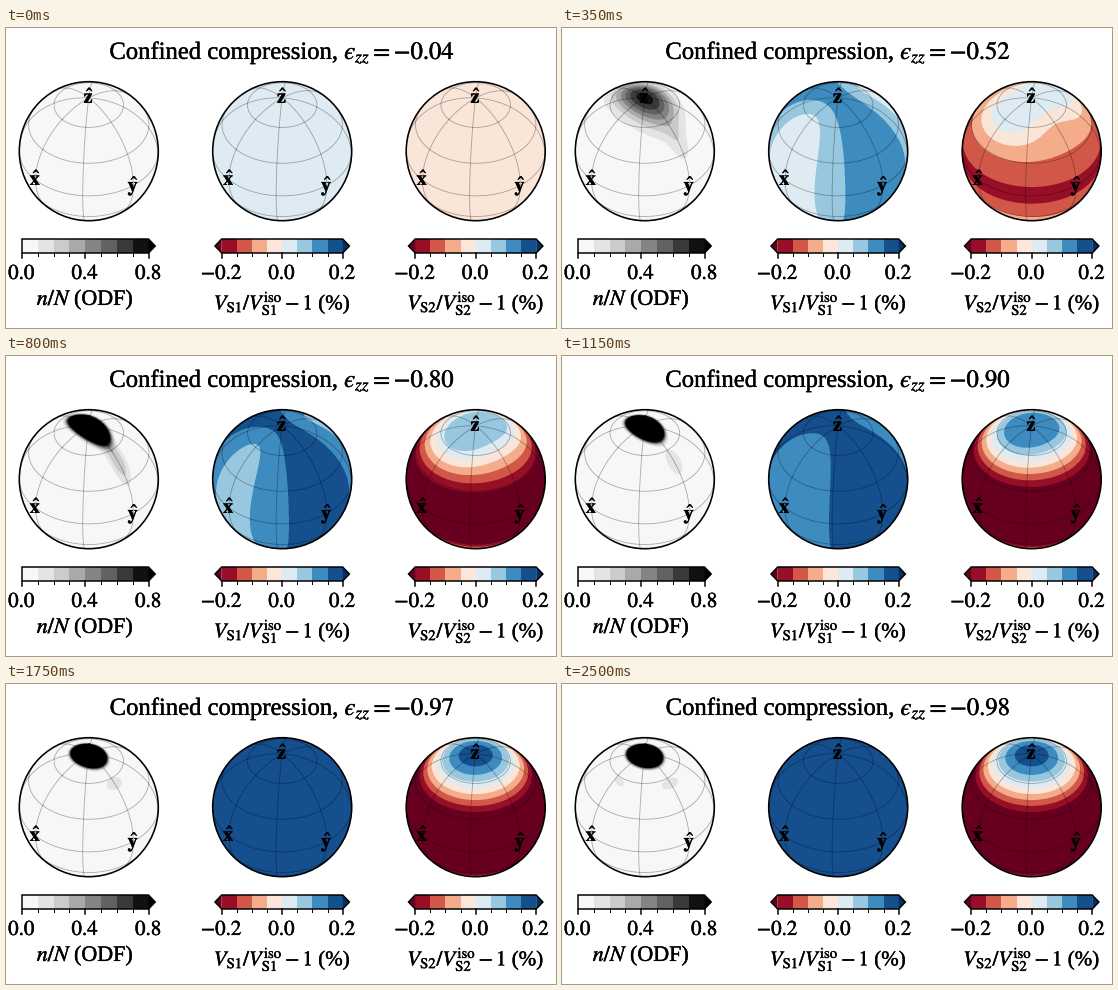
These frames come from a looping animation (550 px wide and 300 px high, 2.8 s). A matplotlib script:

```python
import numpy as np
import matplotlib.pyplot as plt
from matplotlib.animation import FuncAnimation
from matplotlib.patches import Circle, Polygon, Rectangle
from matplotlib.patheffects import withStroke

plt.rcParams.update({
    "font.family": "Liberation Serif",
    "mathtext.fontset": "stix",
})

W, H, DPI = 550, 300, 100
FRAMES, INTERVAL = 56, 50
PX = 72 / DPI                      # points per pixel

R = 69.5
CY = 123.2
CENTRES = (82.8, 276.2, 469.7)
BOX, SS = 142, 3                   # image size and supersampling

# Orthographic view: longitude 50, latitude 40
LON, LAT = np.radians(50), np.radians(40)
RIGHT = np.array([-np.sin(LON), np.cos(LON), 0])
UP = np.array([-np.sin(LAT) * np.cos(LON), -np.sin(LAT) * np.sin(LON), np.cos(LAT)])
TOWARD = np.array([np.cos(LAT) * np.cos(LON), np.cos(LAT) * np.sin(LON), np.sin(LAT)])

# Field parameters at a few values of logarithmic strain
STRAIN = [0.04, 0.73, 1.61, 2.30, 2.82, 3.90]
ODF_KEYS = {
    "log_peak": [-2.53, -0.27, 0.92, 1.10, 1.10, 1.10],
    "sx": [1.60, 0.35, 0.20, 0.205, 0.215, 0.23],
    "sy": [1.60, 0.54, 0.385, 0.325, 0.295, 0.27],
    "power": [2, 2, 4, 4.5, 5, 5],
    "tail": [0, 0.13, 0.30, 0.18, 0.13, 0.125],
    "tail_at": [0.9, 0.90, 0.68, 0.72, 0.62, 0.61],
    "tail_y": [0.35, 0.35, 0.40, 0.25, 0.24, 0.16],
    "tail_x": [0.16, 0.16, 0.13, 0.14, 0.21, 0.30],
    "spot": [0, 0, 0, 0, 0.06, 0.115],
}
S1_KEYS = {
    "base": [0.025, 0.021, 0.087, 0.123, 0.160, 0.172],
    "rise": [0, 0.116, 0.093, 0.060, 0.030, 0.015],
    "pole": [0.10, 0.10, 0.056, 0.08, 0.08, 0.08],
}
S2_KEYS = {
    "base": [-0.025, -0.156, -0.304, -0.371, -0.400, -0.405],
    "cz": [0, 0.2125, 0.437, 0.558, 0.585, 0.59],
    "ex": [0, 0.35, 0.20, 0.10, 0.05, 0],
    "dy": [0, 0.45, 0.25, 0.12, 0.06, 0],
    "top": [0.05, 0.05, 0.10, 0.15, 0.153, 0.25],
}


def at(keys, s):
    return {name: np.interp(s, STRAIN, vals) for name, vals in keys.items()}


def soft_min(v, top, width=0.01):
    return top - width * np.logaddexp(0, (top - v) / width)


def odf(n, s):
    x, y, z = n
    p = at(ODF_KEYS, s)
    a, b = np.arcsin(np.clip(x, -1, 1)), np.arctan2(y, z)
    rho = np.hypot(a / p["sx"], b / p["sy"])
    f = np.exp(p["log_peak"] - rho ** p["power"])
    f += p["tail"] * np.exp(-(a / p["tail_x"]) ** 2
                            - ((b - p["tail_at"]) / p["tail_y"]) ** 2)
    f += p["spot"] * np.exp(-((a - 0.58) / 0.14) ** 2 - ((b - 0.10) / 0.28) ** 2)
    return f


def shear1(n, s):
    # Varies with longitude, levelling out to its maximum at the pole
    x, y, z = n
    p = at(S1_KEYS, s)
    cap = p["pole"] * z ** 4
    return p["base"] + p["rise"] * (y * y + cap) / (x * x + y * y + cap)


def shear2(n, s):
    # Varies with latitude, stretched along x near the pole
    x, y, z = n
    p = at(S2_KEYS, s)
    z2 = z * z
    v = p["base"] + p["cz"] * z2 + z2 ** 3 * (p["ex"] * x * x - p["dy"] * y * y)
    return soft_min(v, p["top"])


def layer_colors(name):
    """Under colour, eight layers, over colour."""
    cmap = plt.get_cmap(name)
    stops = [0.0, *((np.arange(8) + 0.5) / 8), 1.0]
    return np.array([cmap(float(t))[:3] for t in stops], dtype=np.float32)


def view_normals(cx, left, top):
    step = (np.arange(BOX * SS) + 0.5) / SS
    u, v = np.meshgrid((left + step - cx) / R, (CY - top - step) / R)
    r = np.maximum(1, np.hypot(u, v))
    u, v = u / r, v / r
    w = np.sqrt(np.maximum(0, 1 - u * u - v * v))
    return [u * RIGHT[i] + v * UP[i] + w * TOWARD[i] for i in range(3)]


def project(cx, lat, lon):
    n = np.stack([np.cos(lat) * np.cos(lon), np.cos(lat) * np.sin(lon),
                  np.sin(lat) + 0 * lon], axis=-1)
    hidden = n @ TOWARD < 0
    px = np.where(hidden, np.nan, cx + R * (n @ RIGHT))
    py = np.where(hidden, np.nan, CY - R * (n @ UP))
    return px, py


fig = plt.figure(figsize=(W / DPI, H / DPI), dpi=DPI, facecolor="white")
ax = fig.add_axes([0, 0, 1, 1])
ax.axis("off")
HEAVIER = [withStroke(linewidth=0.4 * PX, foreground="black")]


def text(x, y, label, size=21, **kw):
    kw = {"ha": "center", "va": "baseline", "zorder": 6, **kw}
    return ax.text(x, y, label, fontsize=size * PX, color="black",
                   path_effects=HEAVIER, **kw)


def draw_globe(cx):
    style = dict(color="black", alpha=0.32, lw=0.8 * PX, zorder=3)
    sweep = np.linspace(0, 2 * np.pi, 241)
    for lat in np.radians([-60, -30, 0, 30, 60]):
        ax.plot(*project(cx, lat + 0 * sweep, sweep), **style)
    rise = np.linspace(-np.pi / 2, np.pi / 2, 121)
    for lon in np.radians(np.arange(0, 360, 45)):
        ax.plot(*project(cx, rise, lon + 0 * rise), **style)
    ax.add_patch(Circle((cx, CY), R, fill=False, ec="black", lw=1.6 * PX, zorder=4))
    for name, lat, lon in (("x", 0, 0), ("y", 0, 90), ("z", 90, 0)):
        px, py = project(cx, np.radians(lat), np.radians(lon))
        text(float(px), float(py), rf"$\hat{{\mathbf{{{name}}}}}$", 20, va="center")


def draw_bar(x0, x1, colors, both, ticks, label, label_y, size):
    top, bottom, tip = 211, 225, 6.7
    mid, step = (top + bottom) / 2, (x1 - x0) / 8
    for i in range(8):
        ax.add_patch(Rectangle((x0 + i * step, top), step, bottom - top,
                               fc=colors[i + 1], lw=0, zorder=2))
    outline = [(x0, top), (x1, top), (x1 + tip, mid), (x1, bottom), (x0, bottom)]
    ax.add_patch(Polygon(outline[1:4], fc=colors[9], lw=0, zorder=2))
    if both:
        outline.append((x0 - tip, mid))
        ax.add_patch(Polygon([outline[0], outline[4], outline[5]],
                             fc=colors[0], lw=0, zorder=2))
    ax.add_patch(Polygon(outline, fill=False, ec="black", lw=1.5 * PX, zorder=4))
    for i in range(9):
        major = i % 4 == 0
        ax.plot([x0 + i * step] * 2, [bottom, bottom + (5 if major else 3)],
                color="black", lw=(1.5 if major else 1) * PX, zorder=4)
    for i, tick in enumerate(ticks):
        text(x0 + 4 * i * step, 251, f"${tick}$")
    text((x0 + x1) / 2, label_y, label, size)


def speed_label(wave):
    sub = rf"\mathrm{{{wave}}}"
    return rf"$V_{{{sub}}}/V^{{\mathrm{{iso}}}}_{{{sub}}}-1$ (%)"


greys, redblue = layer_colors("Greys"), layer_colors("RdBu")
grey_levels, speed_levels = np.linspace(0, 0.8, 9), np.linspace(-0.2, 0.2, 9)
FIELDS = [(odf, grey_levels, greys),
          (shear1, speed_levels, redblue),
          (shear2, speed_levels, redblue)]

panels = []
for cx, (field, levels, colors) in zip(CENTRES, FIELDS):
    left, top = round(cx) - BOX // 2, round(CY) - BOX // 2
    img = ax.imshow(np.ones((BOX, BOX, 3)), interpolation="nearest", aspect="auto",
                    extent=(left, left + BOX, top + BOX, top), zorder=1)
    img.set_clip_path(Circle((cx, CY), R, transform=ax.transData))
    panels.append((img, view_normals(cx, left, top), field, levels, colors))
    draw_globe(cx)

draw_bar(16, 142.5, greys, False, ("0.0", "0.4", "0.8"), "$n/N$ (ODF)", 277, 22)
for cx, wave in zip(CENTRES[1:], ("S1", "S2")):
    draw_bar(cx - 60.5, cx + 60.5, redblue, True, ("{-}0.2", "0.0", "0.2"),
             speed_label(wave), 281.5, 21)

title = text(276, 31, "", 24.65)
ax.set_xlim(0, W)
ax.set_ylim(H, 0)


def update(k):
    s = min(0.041 + 0.0978 * k, 3.912)
    for img, normals, field, levels, colors in panels:
        rgb = colors[np.digitize(field(normals, s), levels)]
        img.set_data(rgb.reshape(BOX, SS, BOX, SS, 3).mean(axis=(1, 3)))
    title.set_text(rf"Confined compression, $ϵ_{{zz}}={{-}}{1 - np.exp(-s):.2f}$")
    return [p[0] for p in panels] + [title]


anim = FuncAnimation(fig, update, frames=FRAMES, interval=INTERVAL,
                     repeat=True, repeat_delay=0, blit=False)
plt.show()
```
